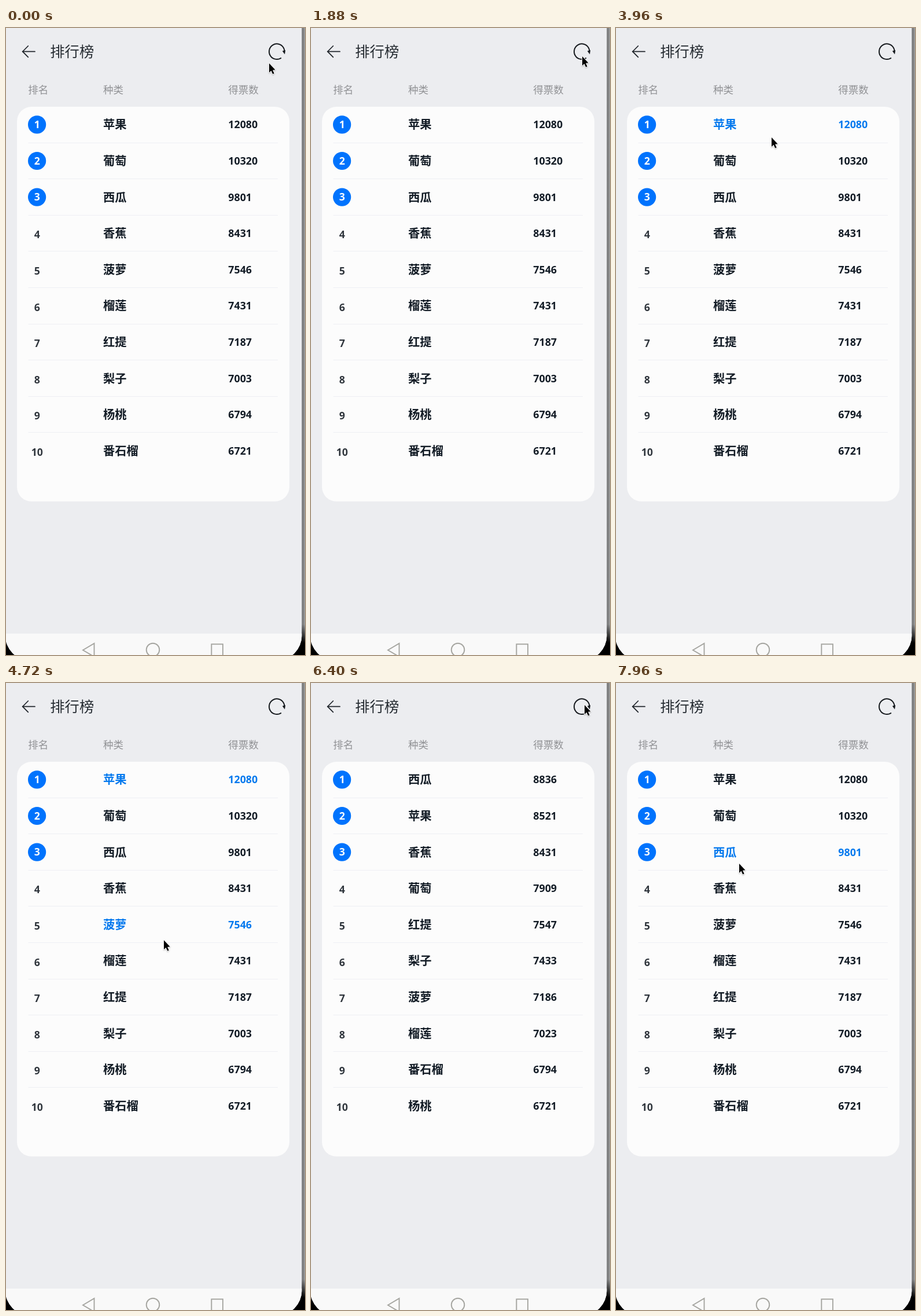
Recreate the animation shown at these times as an HTML page with a canvas. Size 517 by 1083 pixels, loop 8000 ms.

```html
<!DOCTYPE html>
<html lang="zh-CN">
<head>
<meta charset="utf-8">
<title>排行榜</title>
<style>
html, body { margin: 0; width: 100%; height: 100%; overflow: hidden; background: #ecedf0; }
canvas { display: block; width: 517px; height: 1083px; }
</style>
</head>
<body>
<canvas id="stage"></canvas>
<script>
const W = 517, H = 1083, LOOP = 8000;
const canvas = document.getElementById('stage');
const ctx = canvas.getContext('2d');
const dpr = window.devicePixelRatio || 1;
canvas.width = W * dpr;
canvas.height = H * dpr;

const CJK = '"Noto Sans CJK SC", "Noto Sans CJK", sans-serif';
const LATIN = '"Noto Sans", "Open Sans", sans-serif';
const BLUE = '#0073fd', ACCENT = '#0479ee', INK = '#131c26', GREY = '#919295';
const CARD_Y = 136, ROW_Y = 167, ROW_H = 62.6;

const ranking = s => s.split(' ').map(item => item.split(':'));
const lists = [
  ranking('苹果:12080 葡萄:10320 西瓜:9801 香蕉:8431 菠萝:7546 榴莲:7431 红提:7187 梨子:7003 杨桃:6794 番石榴:6721'),
  ranking('西瓜:8836 苹果:8521 香蕉:8431 葡萄:7909 红提:7547 梨子:7433 菠萝:7186 榴莲:7023 番石榴:6794 杨桃:6721')
];

// Pointer stops; a click above the card refreshes, on a row it toggles it.
const stop = (t, x, y) => ({ t, x, y });
const click = (t, x, y) => ({ t, x, y, click: true });
const path = [
  stop(0, 455, 61), stop(400, 530, 46), stop(1440, 530, 60), stop(1880, 469, 49),
  click(2000, 470, 45), click(2480, 470, 45),
  click(3640, 262, 178), stop(3960, 269, 189),
  click(4520, 272, 412), click(4920, 274, 476), stop(5400, 277, 239),
  click(6320, 473, 38), click(6720, 473, 38),
  click(7720, 210, 302), stop(7960, 213, 312)
];

function pointer(t) {
  const next = path.findIndex(p => p.t > t);
  if (next < 0) return path[path.length - 1];
  const a = path[next - 1], b = path[next];
  const u = (t - a.t) / (b.t - a.t), e = u * u * (3 - 2 * u);
  return { x: a.x + (b.x - a.x) * e, y: a.y + (b.y - a.y) * e };
}

function listState(t) {
  let page = 0;
  const lit = new Set();
  for (const p of path.filter(p => p.click && p.t <= t)) {
    const row = Math.floor((p.y - CARD_Y) / ROW_H);
    if (row >= 0) {
      if (!lit.delete(row)) lit.add(row);
    } else {
      page = 1 - page;
      lit.clear();
    }
  }
  return { list: lists[page], lit };
}

function text(s, x, cy, size, weight, color, family = CJK, align = 'left') {
  ctx.font = `${weight} ${size}px ${family}`;
  ctx.textAlign = align;
  ctx.fillStyle = color;
  ctx.fillText(s, x, cy + size * (family === CJK ? 0.38 : 0.357));
}

function trace(points, closed) {
  ctx.beginPath();
  points.forEach(([x, y], i) => i ? ctx.lineTo(x, y) : ctx.moveTo(x, y));
  if (closed) ctx.closePath();
}

function disc(x, y, r) {
  ctx.beginPath();
  ctx.arc(x, y, r, 0, Math.PI * 2);
}

function pen(color, width) {
  ctx.strokeStyle = color;
  ctx.lineWidth = width;
}

function phone() {
  const edge = ctx.createLinearGradient(511, 0, 517, 0);
  edge.addColorStop(0, '#8b8c8d');
  edge.addColorStop(0.4, '#777879');
  edge.addColorStop(1, '#a0a1a1');
  ctx.fillStyle = edge;
  ctx.fillRect(0, 0, W, H);

  const shade = ctx.createLinearGradient(0, 1030, 0, 1062);
  shade.addColorStop(0, 'rgba(0,0,0,0)');
  shade.addColorStop(1, '#000');
  ctx.fillStyle = shade;
  ctx.fillRect(0, 1030, W, 53);

  ctx.save();
  ctx.beginPath();
  ctx.roundRect(-1, -60, 512.3, 1152, [0, 0, 42, 42]);
  ctx.clip();
  ctx.fillStyle = '#ecedf0';
  ctx.fillRect(0, 0, W, H);
  ctx.fillStyle = '#f9f9f9';
  ctx.fillRect(0, 1046, W, 37);
  ctx.restore();

  ctx.lineJoin = 'miter';
  pen('#a5a5a0', 1.9);
  trace([[133, 1074.5], [152.5, 1063], [152.5, 1086]], true);
  ctx.stroke();
  disc(254, 1074, 11.3);
  ctx.stroke();
  ctx.strokeRect(355.3, 1064.3, 19.6, 19.6);
}

function header() {
  pen('#20252b', 1.7);
  ctx.lineCap = 'round';
  trace([[50, 40.7], [28.7, 40.7]]);
  ctx.stroke();
  trace([[38.3, 31], [28.7, 40.7], [38.3, 50.4]]);
  ctx.stroke();

  pen('#15191d', 2);
  ctx.beginPath();
  ctx.arc(468.3, 40.7, 13.3, 1.02, Math.PI * 2 - 0.1);
  ctx.stroke();
  ctx.lineCap = 'butt';
  trace([[477.8, 39.8], [483.2, 38.2], [482, 45.5]], true);
  ctx.fillStyle = '#15191d';
  ctx.fill();

  text('排行榜', 76.3, 40, 25.3, 400, '#272d33');
  text('排名', 38.3, 106, 17.5, 400, GREY);
  text('种类', 168, 106, 17.5, 400, GREY);
  text('得票数', 384.3, 106, 17.5, 400, GREY);
}

function table({ list, lit }) {
  ctx.beginPath();
  ctx.roundRect(19, CARD_Y, 471, 681.7, 25);
  ctx.fillStyle = '#fcfcfc';
  ctx.fill();
  list.forEach(([name, votes], i) => {
    const y = ROW_Y + i * ROW_H, color = lit.has(i) ? ACCENT : INK;
    const top = i < 3;
    if (top) {
      disc(53.6, y - 0.1, 15.6);
      ctx.fillStyle = BLUE;
      ctx.fill();
    }
    text(i + 1, 53.8, top ? y : y + 2.4, 17.6, 600, top ? '#fff' : '#30363d', LATIN, 'center');
    text(name, 167.9, y - 0.4, 20.3, 700, color);
    text(votes, 384.3, y, 17.8, 700, color, LATIN);
    if (i < list.length - 1) {
      ctx.fillStyle = '#eeeff4';
      ctx.fillRect(38.5, Math.round(y + 30.6), 431.5, 1);
    }
  });
}

function arrow({ x, y }) {
  ctx.save();
  ctx.translate(x, y);
  trace([[0, 0], [0, 16], [3.5, 12.8], [6.2, 18.6], [8.7, 17.4], [6.1, 11.7], [10.6, 11.3]], true);
  ctx.shadowColor = 'rgba(0,0,0,0.25)';
  ctx.shadowBlur = 2 * dpr;
  ctx.shadowOffsetY = dpr;
  ctx.lineJoin = 'round';
  pen('#fff', 1.8);
  ctx.stroke();
  ctx.shadowColor = 'transparent';
  ctx.fillStyle = '#000';
  ctx.fill();
  ctx.restore();
}

function draw(t) {
  ctx.setTransform(dpr, 0, 0, dpr, 0, 0);
  phone();
  header();
  table(listState(t));
  arrow(pointer(t));
}

const start = performance.now();
function tick() {
  draw((performance.now() - start) % LOOP);
  requestAnimationFrame(tick);
}
tick();
</script>
</body>
</html>
```
